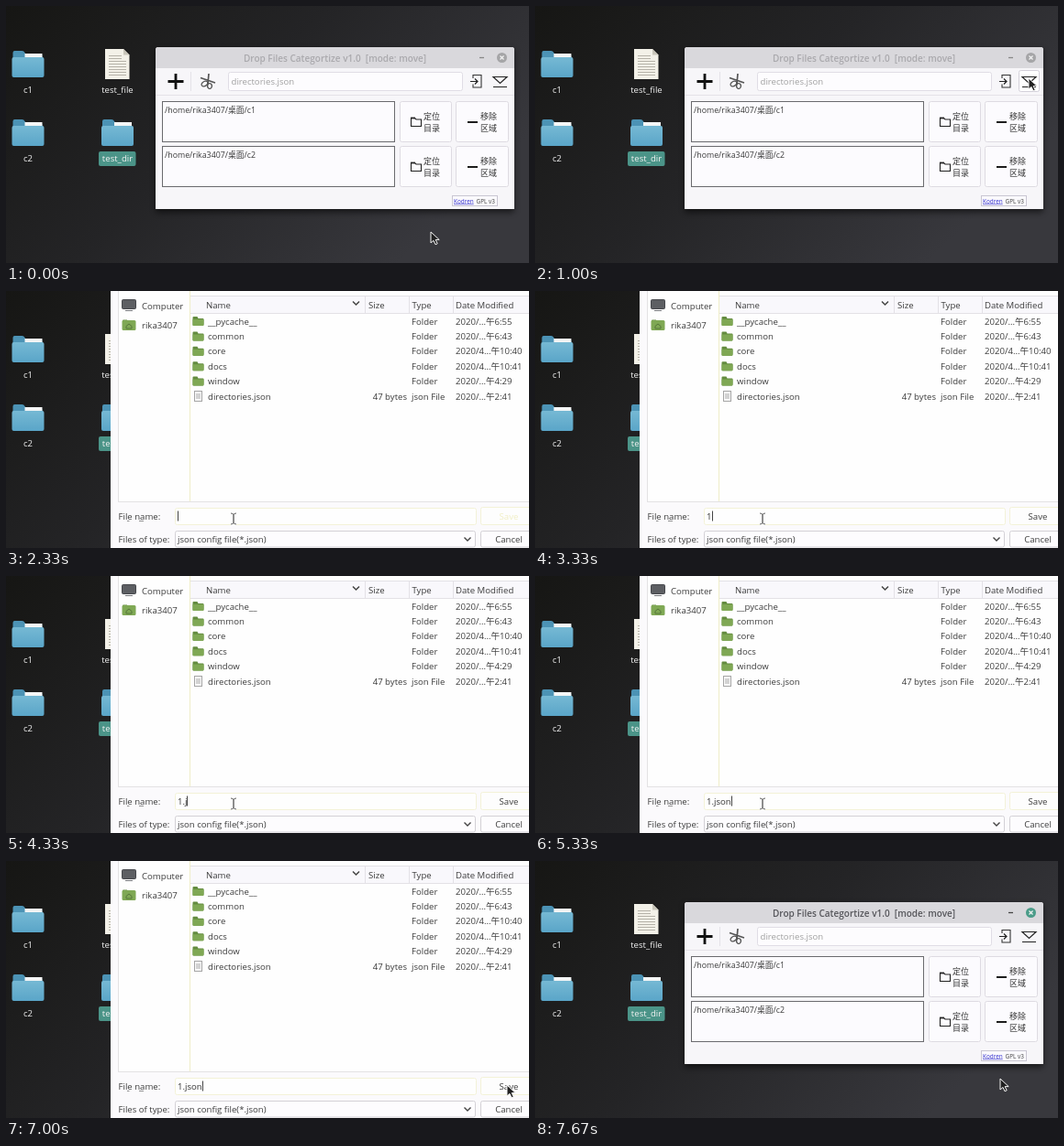
These frames come from a looping animation (570x281 px, 8 s). An HTML page:

```html
<!DOCTYPE html>
<html lang="en">
<head>
<meta charset="utf-8">
<title>Drop files</title>
<style>
html, body { margin: 0; width: 100%; height: 100%; overflow: hidden; background: #19191a; }
svg { display: block; width: 570px; height: 281px; }
text { font-family: "Open Sans", "Noto Sans", "Noto Sans CJK SC", "Noto Sans CJK", sans-serif; white-space: pre; }
</style>
</head>
<body>
<svg id="stage" viewBox="0 0 570 281" xmlns="http://www.w3.org/2000/svg">
  <defs>
    <linearGradient id="desk" x1="0" y1="0" x2="1" y2="0.5">
      <stop offset="0" stop-color="#161614"/>
      <stop offset="0.5" stop-color="#242426"/>
      <stop offset="1" stop-color="#38383d"/>
    </linearGradient>
    <linearGradient id="blue" x1="0" y1="0" x2="0" y2="1">
      <stop offset="0" stop-color="#76b9d4"/>
      <stop offset="1" stop-color="#5aa5c8"/>
    </linearGradient>
    <filter id="soft" x="-10%" y="-10%" width="120%" height="130%"><feGaussianBlur stdDeviation="3"/></filter>
    <g id="folder">
      <path d="M1 2q0-2 2-2h8q2 0 3 2l2 3h17v8H1z" fill="#4c93b5"/>
      <path d="M14 3h19v8H14z" fill="#f4f6f6"/>
      <path d="M0 9q0-2 2-2h31q2 0 2 2v18q0 2-2 2H2q-2 0-2-2z" fill="url(#blue)"/>
    </g>
    <g id="mini">
      <path d="M0 1.500q0-1 1-1h4l1 2h5q1 0 1 1v5q0 2-1 2H1q-1 0-1-1z" fill="#648c40"/>
      <path d="M0 3.500h12v6q0 1-1 1H1q-1 0-1-1z" fill="#7fa854"/>
    </g>
    <path id="arrow" d="M0 0v12l3-2.6 2 4.4 2.2-1-2-4.2h4z" fill="#202020" stroke="#f4f4f4" stroke-width="1"/>
    <g id="beam" fill="none">
      <path d="M-3-6q3 0 3 2v8q0 2-3 2M3-6q-3 0-3 2v8q0 2 3 2" stroke="#fff" stroke-width="2.4"/>
      <path d="M-3-6q3 0 3 2v8q0 2-3 2M3-6q-3 0-3 2v8q0 2 3 2" stroke="#666" stroke-width="1"/>
    </g>
  </defs>
  <rect width="570" height="281" fill="url(#desk)"/>
  <g id="icons"></g>
  <g id="main"></g>
  <g id="dialog"></g>
  <use id="pointer"/>
</svg>
<script>
const $ = id => document.getElementById(id);
const USER = 'rika3407';

const text = (x, y, s, size = 9.6, fill = '#3c3c3c', more = '') =>
  `<text x="${x}" y="${y}" font-size="${size}" fill="${fill}" ${more}>${s}</text>`;
const box = (x, y, w, h, fill, stroke = 'none', r = 0, more = '') =>
  `<rect x="${x}" y="${y}" width="${w}" height="${h}" rx="${r}" fill="${fill}" stroke="${stroke}" ${more}/>`;
const line = (d, stroke, width = 1, more = '') =>
  `<path d="${d}" fill="none" stroke="${stroke}" stroke-width="${width}" ${more}/>`;
const use = (id, x, y) => `<use href="#${id}" x="${x}" y="${y}"/>`;
const MID = 'text-anchor="middle"';

function desktopIcons() {
  const label = (x, y, s) => text(x, y, s, 9.6, '#f2f2f2', MID);
  let lines = '';
  for (let y = 54; y < 76; y += 3) lines += `M112 ${y}.5h${y < 60 ? 14 : 19}`;
  return use('folder', 6.5, 49) + use('folder', 6.5, 124) + use('folder', 104, 124) +
    '<path d="M108 47h20l6.5 6.5V80H108z" fill="#f3f1e8"/><path d="M128 47v6.5h6.5z" fill="#c9c6ba"/>' +
    line(lines, '#b5b2a8') + box(101, 159, 40.5, 16, '#4b9488', 'none', 2) +
    label(24, 95, 'c1') + label(121.5, 95, 'test_file') + label(24, 170, 'c2') + label(121.5, 170, 'test_dir');
}

function dropRow(y, dir) {
  const cjk = (x, dy, s) => text(x, y + dy, s, 9, '#333');
  const edge = '#dedbe2';
  return box(170.5, y + .5, 253, 44, '#fcfbfe', '#6a6a6e') +
    text(173, y + 13, `/home/${USER}/桌面/${dir}`, 8.8, '#3a3a3a') +
    box(429.5, y + .5, 56, 44, '#fcfbfe', edge, 2) + box(490.5, y + .5, 57, 44, '#fcfbfe', edge, 2) +
    line(`M441.5 ${y + 27.5}v-9h4l1.5 1.5h5.5v7.500z`, '#222', 1.1) +
    line(`M441 ${y + 18.5}h5`, '#222', 1.8) +
    cjk(455, 20, '定位') + cjk(455, 32.5, '目录') +
    line(`M503 ${y + 23}h11`, '#1c1c1c', 2) +
    cjk(517, 20, '移除') + cjk(517, 32.5, '区域');
}

function mainWindow() {
  return box(163, 47, 391, 179, '#000', 'none', 3, 'opacity=".5" filter="url(#soft)"') +
    '<path d="M163 222V48q0-3 3-3h385q3 0 3 3v174z" fill="#f7f6f9"/>' +
    '<path d="M163 68V48q0-3 3-3h385q3 0 3 3v20z" fill="#d9d8dc"/>' +
    text(358.5, 60.5, 'Drop Files Categortize v1.0  [mode: move]', 10, '#aaa', MID + ' font-weight="600" id="title"') +
    '<path id="min" d="M516 56.500h5" stroke-width="1.3"/><circle id="close" cx="540.500" cy="56.500" r="5.500"/>' +
    line('M538.500 54.500l4 4m0-4l-4 4', '#f3f3f3', 1.2) +
    line('M163 97.500h391M201.500 72v21', '#e4e2e8') +
    line('M176.500 82.500h17M185 74v17', '#111', 2.8) +
    line('M212 78.500l16 5.500M221 74l-1 11', '#555', 1.7) +
    line('M219 82.500a3 2 -30 1 0-5 5a3 2 -30 1 0 5-5M220 86a2 2.500 0 1 0 4 3a2 2.500 0 1 0-4-3', '#555', 1.3) +
    box(242.5, 72.5, 255, 20, '#fdfcfe', '#e0dde5', 2) +
    text(245.5, 86, 'directories.json', 9.6, '#a0a0a0') +
    line('M509 79v-3.500h9v13.500h-9v-3.500', '#333', 1.1) +
    line('M506 82.500h8m-3-3l3 3l-3 3', '#222', 1.2) +
    box(527.5, 70.5, 22, 23, '#fff', '#d4d1da', 2, 'id="hover"') +
    line('M531 77.500h15l-7.500 7zM531 88.500h15', '#222', 1.2) +
    dropRow(104, 'c1') + dropRow(153, 'c2') +
    box(486.5, 207.5, 49, 11, '#faf9fc', '#c9c6d2') +
    text(488, 215.5, 'Kodren', 6.4, '#3430cf', 'text-decoration="underline"') +
    text(512.5, 215.5, 'GPL v3', 6.4, '#444');
}

function fileDialog() {
  const rows = [
    ['__pycache__', '2020/…午6:55'], ['common', '2020/…午6:43'], ['core', '2020/4…午10:40'],
    ['docs', '2020/4…午10:41'], ['window', '2020/…午4:29'], ['directories.json', '2020/…午2:41']
  ];
  const edge = '#e3e2e4', glow = '#f3f2d8', ink = '#3c3c3c';
  let out = box(114, 0, 456, 281, '#fbfafc') +
    box(122.5, -5, 78, 235.5, '#fefefe', edge) + box(200.5, -5, 380, 235.5, '#fefefe', edge) +
    box(201, 5, 370, 19, '#f9f8fc') + line('M200.500 0v230', '#efedc8') +
    line('M201 5.500h370M201 24.500h370M391.500 6v18M439.500 6v18M487.500 6v18', '#e3e1e6') +
    line('M378 11.500l3.500 3.500l3.500-3.500', '#444', 1.5) +
    text(218, 18.5, 'Name') + text(395, 18.5, 'Size') + text(442.5, 18.5, 'Type') + text(490, 18.5, 'Date Modified') +
    box(126.5, 9.5, 15, 10, '#5d5f63', '#46484c', 1) + line('M130 21.500h8', '#77797d') +
    use('mini', 127, 31) + box(126.5, 32, 15, 11, '#7fa854', 'none', 1.5) +
    line('M131 38.500l3-2.500l3 2.500v2.500h-6z', '#56773a') +
    text(148, 20, 'Computer') + text(148, 41, USER);
  rows.forEach(([name, date], i) => {
    const y = 33 + i * 16.4, base = y + 3.5, dir = i < 5;
    out += dir ? use('mini', 203.5, y - 5.5)
      : box(205.5, y - 5.5, 8, 11, '#fafafa', '#a5a5a5') + line(`M207 ${y - 2}h5m-5 2h5m-5 2h5`, '#999', .8);
    out += text(220, base, name) + text(490, base, date) + text(442, base, dir ? 'Folder' : 'json File');
    if (!dir) out += text(437, base, '47 bytes', 9.6, ink, 'text-anchor="end"');
  });
  return out + text(122.5, 249.5, 'File name:') + text(122.5, 275, 'Files of type:') +
    line('M132 251.500h2.500M145 251.500h5', '#666', .7) +
    box(184.5, 237.5, 328, 18, '#fefefe', glow, 2) +
    box(517.5, 236.5, 60, 19, '#fdfdfd', glow, 2) +
    text(548, 249.5, 'Save', 9.6, ink, MID + ' id="save"') +
    box(184.5, 262.5, 327, 17.5, '#fdfcfe', '#d3d1d6', 2) + text(187, 275, 'json config file(*.json)') +
    line('M499.500 269.500l3.500 3.500l3.500-3.500', '#444', 1.4) +
    box(517.5, 262.5, 60, 17.5, '#fdfcfe', '#d3d1d6', 2) + text(548, 275, 'Cancel', 9.6, ink, MID) +
    text(187, 249.5, '', 9.6, '#333', 'id="typed"') + '<path id="caret" d="M0 240.500v11" stroke="#444"/>';
}

$('icons').innerHTML = desktopIcons();
$('main').innerHTML = mainWindow();
$('dialog').innerHTML = fileDialog();

// [start ms, pointer, x, y]
const moves = [
  [0, 'arrow', 463, 247], [330, 'arrow', 480, 205], [670, 'arrow', 522, 118], [1000, 'arrow', 538, 79],
  [2000, 'beam', 330, 225], [2330, 'beam', 248, 249], [6000, 'beam', 266, 249], [6330, 'beam', 309, 249],
  [6670, 'arrow', 490, 247], [7000, 'arrow', 546, 245], [7670, 'arrow', 507, 238]
];
const typing = [[0, ''], [3330, '1'], [4000, '1.'], [4330, '1.j'], [4670, '1.js'], [5000, '1.jso'], [5330, '1.json']];
const OPEN = 1670, SHUT = 7330, LOOP = 8000;
const at = (steps, t) => steps.filter(s => s[0] <= t).pop();
const show = (id, on) => $(id).setAttribute('visibility', on ? 'visible' : 'hidden');

let last = '';
function draw(t) {
  const move = at(moves, t), word = at(typing, t)[1];
  const open = t >= OPEN && t < SHUT, active = t >= SHUT, hover = t >= 1000 && t < OPEN;
  const state = [move, word, open, active, hover].join();
  if (state === last) return;
  last = state;
  $('pointer').setAttribute('href', '#' + move[1]);
  $('pointer').setAttribute('transform', `translate(${move[2]} ${move[3]})`);
  $('main').style.display = open ? 'none' : '';
  $('dialog').style.display = open ? '' : 'none';
  show('hover', hover);
  $('title').setAttribute('fill', active ? '#55555a' : '#aaa9ad');
  $('min').setAttribute('stroke', active ? '#444' : '#888');
  $('close').setAttribute('fill', active ? '#4b9c89' : '#a5a5a7');
  if (!open) return;
  $('typed').textContent = word;
  $('save').setAttribute('fill', word ? '#3c3c3c' : '#f0eec4');
  const width = word ? $('typed').getComputedTextLength() : 0;
  $('caret').setAttribute('transform', `translate(${Math.round(187 + width) + .5} 0)`);
}

const start = performance.now();
function tick() {
  draw((performance.now() - start) % LOOP);
  requestAnimationFrame(tick);
}
tick();
</script>
</body>
</html>
```
